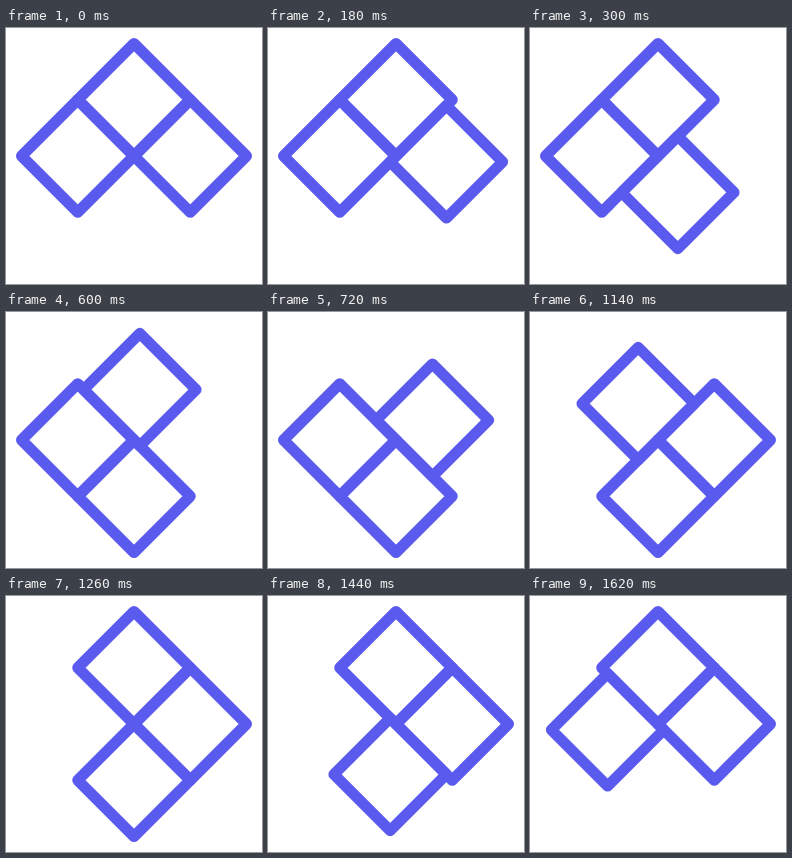
These frames come from a looping animation (256 px wide and 256 px high, 1.68 s). An HTML page:

```html
<!DOCTYPE html>
<html lang="en">
<head>
<meta charset="utf-8">
<title>Sliding squares</title>
<style>
  html, body { margin: 0; width: 100%; height: 100%; overflow: hidden; background: #fff; }
  svg { display: block; width: 100vw; height: 100vh; }
  path { fill: none; stroke: #5a5aee; stroke-width: 11; stroke-linejoin: round; }
</style>
</head>
<body>
<svg viewBox="0 0 256 256"></svg>
<script>
const D = 56.25;          // half diagonal of a square
const STEP = 60;          // ms per drawn step
const STAGE = 7;          // steps per slide, rest included
const REST = 2;           // steps before a slide sets off

const top_ = [0, -1], right = [1, 0], bottom = [0, 1], left = [-1, 0];

// Place of each square at the start of every stage and at the end of the last.
const routes = [
  [right, bottom, bottom, bottom, left],
  [top_, top_, right, right, right],
  [left, left, left, top_, top_]
];

const svg = document.querySelector('svg');
const squares = routes.map(() => {
  const el = document.createElementNS('http://www.w3.org/2000/svg', 'path');
  el.setAttribute('d', `M0 ${-D}L${D} 0L0 ${D}L${-D} 0Z`);
  return svg.appendChild(el);
});

const smooth = p => p * p * (3 - 2 * p);

function draw(time) {
  const step = Math.floor(time / STEP) % (STAGE * 4);
  const stage = Math.floor(step / STAGE);
  const p = smooth(Math.max(0, (step % STAGE - REST) / (STAGE - REST)));
  squares.forEach((el, i) => {
    const a = routes[i][stage], b = routes[i][stage + 1];
    const [x, y] = a.map((v, k) => 128 + D * (v + (b[k] - v) * p));
    el.setAttribute('transform', `translate(${x} ${y})`);
  });
}

const start = performance.now();
function tick(now) {
  draw(Math.max(0, now - start));
  requestAnimationFrame(tick);
}
draw(0);
requestAnimationFrame(tick);
</script>
</body>
</html>
```
